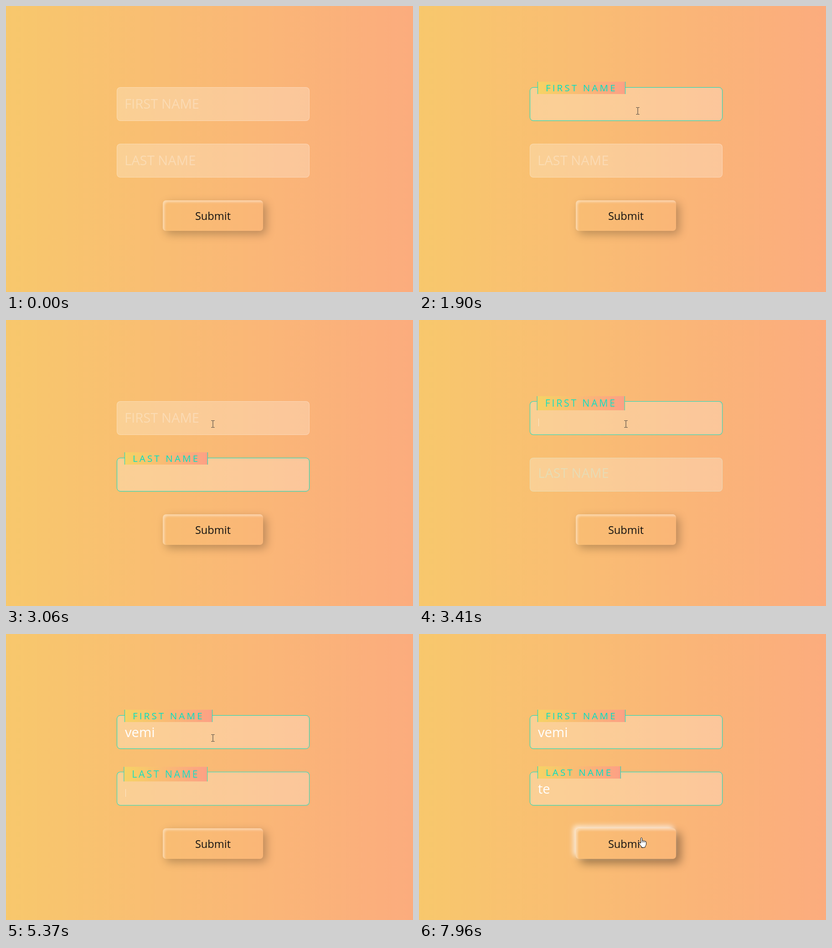
These frames come from a looping animation (893x627 px, 8 s). An HTML page:

```html
<!DOCTYPE html>
<html lang="en">
<head>
<meta charset="utf-8">
<title>Floating labels</title>
<style>
  html, body { margin: 0; width: 100%; height: 100%; overflow: hidden; }
  body {
    position: relative;
    background: linear-gradient(to right, #f6d365, #fda085) -370px 0 / 1648px 100% no-repeat;
    font-family: "Open Sans", "Noto Sans", sans-serif;
  }
  .field {
    --p: 0;
    --ink: color-mix(in srgb, #00dfc4 calc(var(--p) * 100%), rgba(255, 255, 255, .28));
    position: absolute; left: 243px; width: 423px; height: 74px;
    box-sizing: border-box; border: 1px solid var(--ink); border-radius: 8px;
    background: rgba(255, 255, 255, .25) border-box;
  }
  .value {
    position: absolute; left: 17px; top: 17px; height: 39px;
    font-size: 29.2px; line-height: 39px; color: #fff; white-space: pre;
  }
  .caret {
    position: absolute; left: calc(100% + 1px); top: 2px;
    width: 1px; height: 35px; background: #fff;
  }
  .caret.bare { top: 20px; height: 17px; opacity: .5; }
  .label {
    position: absolute; left: -1px; top: -1px;
    transform: translate(calc(17px * var(--p)), calc(-12px * var(--p)));
    padding: calc(17px * (1 - var(--p))) 17px;
    border: solid var(--ink); border-width: 0;
    font-size: calc(29.2px - 8.6px * var(--p)); line-height: 1.33;
    letter-spacing: calc(4.1px * var(--p));
    color: var(--ink); white-space: pre;
  }
  .focus .label {
    border-width: 0 1px;
    background: linear-gradient(to right, #f6d365, #fda085);
  }
  .button {
    --h: 0;
    position: absolute; left: 344px; top: 426px; width: 220px; height: 67px;
    border-radius: 7px; text-align: center;
    font-size: 23.6px; line-height: 68px; color: #111;
    box-shadow:
      inset 4px 4px 4px rgba(255, 255, 255, .4),
      calc(-6px * var(--h)) calc(-6px * var(--h)) calc(12px * var(--h)) rgba(255, 255, 255, calc(.8 * var(--h))),
      calc(7px + 3px * var(--h)) calc(7px + 3px * var(--h)) 20px rgba(0, 0, 0, calc(.25 + .13 * var(--h)));
  }
  #cursor { position: absolute; left: 0; top: 0; width: 1px; height: 1px; overflow: visible; }
</style>
</head>
<body>
<div class="field" style="top:178px"><div class="value"><span></span><i class="caret"></i></div><div class="label">FIRST NAME</div></div>
<div class="field" style="top:302px"><div class="value"><span></span><i class="caret"></i></div><div class="label">LAST NAME</div></div>
<div class="button">Submit</div>
<svg id="cursor">
  <g data-kind="beam" fill="none">
    <path d="M-3.5-7.5h3M.5-7.5h3M0-7V7M-3.5 7.5h3M.5 7.5h3" stroke="#333"/>
  </g>
  <path data-kind="arrow" d="M.5.5V17L4.3 13.4 6.8 19 9.2 18 6.8 12.500H12Z" fill="#fff" stroke="#000"/>
  <g data-kind="hand" fill="#fff" stroke="#111" stroke-linejoin="round">
    <path d="M-1.500 1.500Q0-1 1.500 1.500V7Q3.500 5.500 4.500 7.500 6.500 6.500 7.500 8.500 10 7.500 10.500 10V15Q10 18 8 20V22H0V20L-5.500 13Q-6 10.500-3.500 11L-1.500 13Z"/>
    <path d="M1.500 7v4M4.500 8v3M7.500 9v2"/>
  </g>
</svg>
<script>
const LOOP = 8000, FADE = 500, BLINK = 530;

// flips: times at which the label goes up, down, up ...
const fields = [
  { flips: [1185, 2150, 3080], blur: 5060, text: 'vemi', keys: [4090, 4290, 4420, 4620] },
  { flips: [2150, 3080, 5060], blur: LOOP, text: 'te', keys: [5910, 5980] }
];
const hover = [7620];

// time, x, y
const path = [
  [450, 659, 444], [560, 590, 372], [680, 535, 312], [800, 494, 258],
  [950, 480, 230], [1970, 480, 230], [2120, 480, 331], [2780, 480, 331],
  [3040, 454, 228], [6779, 454, 228], [6780, 497, 225], [6950, 636, 231],
  [7080, 760, 237], [7200, 752, 272], [7400, 690, 350], [7540, 623, 399],
  [7700, 535, 440], [7820, 497, 448], [7960, 488, 446]
];

const bezier = (a, b, s) => 3 * a * s * (1 - s) ** 2 + 3 * b * s * s * (1 - s) + s ** 3;

function ease(x) {
  let lo = 0, hi = 1;
  for (let i = 0; i < 24; i++) {
    const mid = (lo + hi) / 2;
    if (bezier(.25, .25, mid) < x) lo = mid; else hi = mid;
  }
  return bezier(.1, 1, lo);
}

const countPast = (times, t) => times.filter(v => v <= t).length;

function level(flips, t) {
  const n = countPast(flips, t);
  if (!n) return 0;
  const x = (t - flips[n - 1]) / FADE;
  const e = x >= 1 ? 1 : ease(x);
  return n % 2 ? e : 1 - e;
}

function pointAt(t) {
  const i = path.findIndex(p => p[0] > t);
  if (i < 0) return path[path.length - 1].slice(1);
  const [t0, x0, y0] = path[i - 1], [t1, x1, y1] = path[i];
  const k = (t - t0) / (t1 - t0);
  return [Math.round(x0 + (x1 - x0) * k), Math.round(y0 + (y1 - y0) * k)];
}

function kindAt(x, y) {
  const inside = (l, t, r, b) => x >= l && x <= r && y >= t && y <= b;
  if (inside(243, 178, 665, 251) || inside(243, 302, 665, 375)) return 'beam';
  return inside(344, 426, 564, 493) ? 'hand' : 'arrow';
}

const boxes = [...document.querySelectorAll('.field')];
const button = document.querySelector('.button');
const cursor = document.getElementById('cursor');

function drawField(el, f, t) {
  const up = countPast(f.flips, t) % 2 === 1;
  const typed = countPast(f.keys, t);
  const since = t - Math.max(0, ...f.flips.concat(f.keys).filter(v => v <= t));
  const caret = el.querySelector('.caret');
  el.style.setProperty('--p', level(f.flips, t).toFixed(4));
  el.classList.toggle('focus', up);
  el.querySelector('span').textContent = f.text.slice(0, typed);
  caret.classList.toggle('bare', !typed);
  caret.style.visibility = up && t < f.blur && since % (2 * BLINK) < BLINK ? 'visible' : 'hidden';
}

function drawCursor(t) {
  const shown = t >= path[0][0];
  cursor.style.display = shown ? 'block' : 'none';
  if (!shown) return;
  const [x, y] = pointAt(t), kind = kindAt(x, y);
  cursor.style.transform = `translate(${x}px, ${y}px)`;
  for (const g of cursor.children) g.style.display = g.dataset.kind === kind ? 'inline' : 'none';
}

const start = performance.now();

function draw() {
  const t = (performance.now() - start) % LOOP;
  boxes.forEach((el, i) => drawField(el, fields[i], t));
  button.style.setProperty('--h', level(hover, t).toFixed(4));
  drawCursor(t);
  requestAnimationFrame(draw);
}
draw();
</script>
</body>
</html>
```
